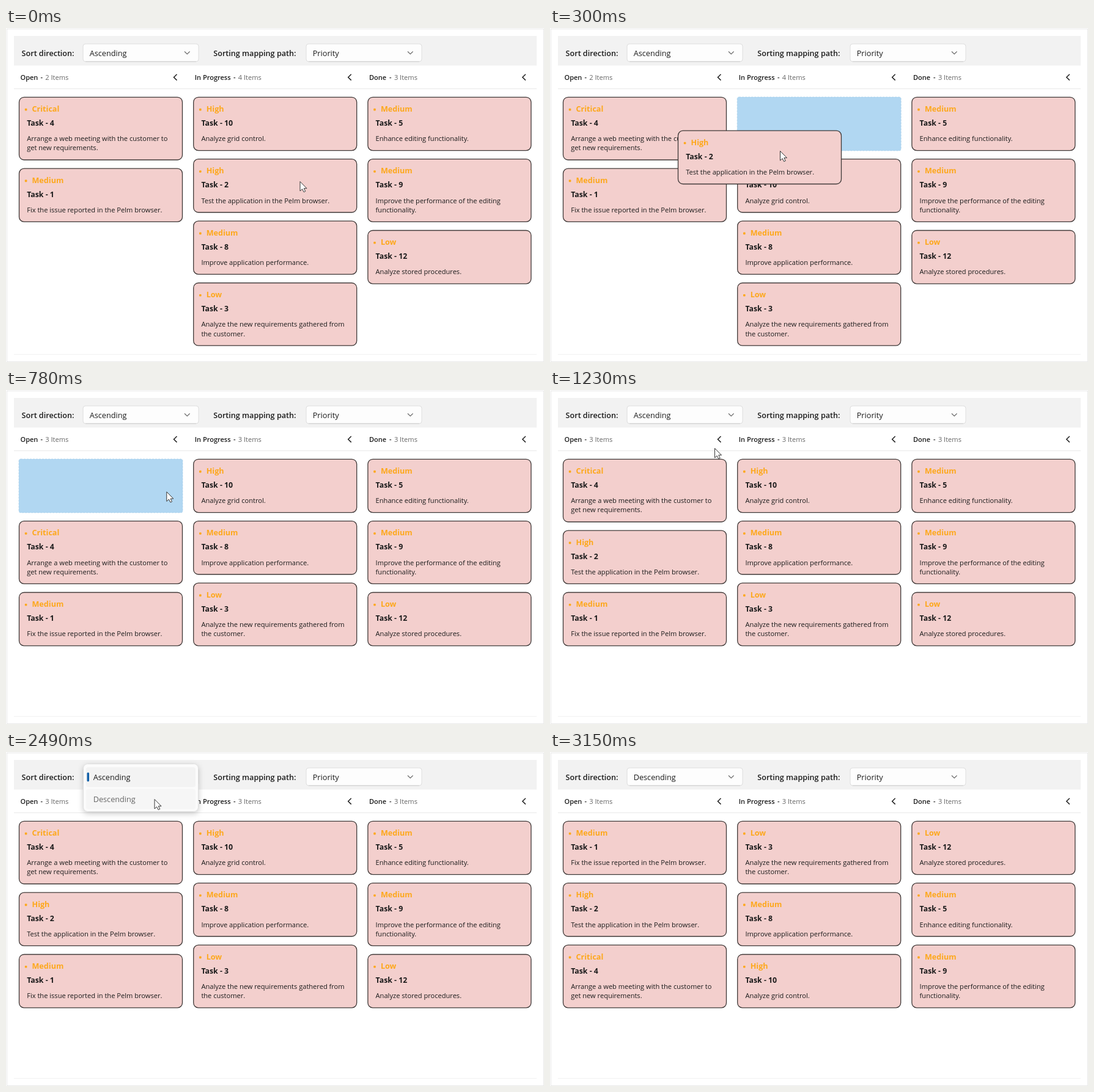
Write an HTML page that moves like this. It is 880 px wide and 547 px high and loops after 3.21 s.

```html
<!DOCTYPE html>
<html lang="en">
<head>
<meta charset="utf-8">
<title>Kanban sorting</title>
<style>
html, body { margin: 0; width: 100%; height: 100%; overflow: hidden; background: #fff; }
svg { display: block; font-family: "Open Sans", "Noto Sans", sans-serif; }
text { fill: #1b1b1b; font-size: 11.1px; white-space: pre; }
.label { font-size: 12.6px; font-weight: 600; }
.value { font-size: 12.7px; }
.head { font-size: 11px; font-weight: 600; }
.count { fill: #666; }
.prio { font-size: 12.6px; font-weight: 700; fill: #fda81c; }
.task { font-size: 12.3px; font-weight: 700; }
.card { fill: #f3cfcd; stroke: #403a39; stroke-width: 1.3; }
.slot { fill: #b1d7f2; stroke: #a3cbe6; stroke-width: .6; stroke-dasharray: 3 2; }
.line { fill: none; stroke: #e9e9e9; }
.chev { fill: none; stroke: #222; stroke-width: 1.5; }
.drop { fill: none; stroke: #666; stroke-width: 1.1; }
.popup { fill: #fbfbfb; stroke: #dedede; filter: drop-shadow(0 3px 5px #0003); }
</style>
</head>
<body>
<svg id="stage" width="880" height="547" viewBox="0 0 880 547"></svg>
<script>
const LOOP = 3210, STEP = 30;
const LIFT = 60, SWAP = 270, ENTER = 510, DROP = 720, SETTLE = 870;
const OPEN = 1650, PRESS = 2400, CLOSE = 2700, SORT = 2760, LEAVE = 3150;

const tasks = {
  1: ['Medium', 'Fix the issue reported in the Pelm browser.'],
  2: ['High', 'Test the application in the Pelm browser.'],
  3: ['Low', 'Analyze the new requirements gathered from', 'the customer.'],
  4: ['Critical', 'Arrange a web meeting with the customer to', 'get new requirements.'],
  5: ['Medium', 'Enhance editing functionality.'],
  8: ['Medium', 'Improve application performance.'],
  9: ['Medium', 'Improve the performance of the editing', 'functionality.'],
  10: ['High', 'Analyze grid control.'],
  12: ['Low', 'Analyze stored procedures.']
};

// Pointer stops: time, x, y
const path = [
  [0, 481, 251.5], [300, 376.5, 201.5], [630, 262.8, 166.8], [1080, 262.8, 166.8],
  [1230, 269.5, 95.5], [1410, 283, 42], [1740, 283, 42], [2010, 245.5, 72.3],
  [2220, 243, 77.5], [2730, 243, 77.5], [3120, 232, 14]
];

const text = (x, y, cls, s) => `<text x="${x}" y="${y}" class="${cls}">${s}</text>`;
const rect = (x, y, w, h, r, attrs) =>
  `<rect x="${x}" y="${y}" width="${w}" height="${h}" rx="${r}" ${attrs}/>`;
const height = id => id && tasks[id][2] ? 102.7 : 87.3;

function pointer(t) {
  const i = Math.max(1, path.findIndex(p => p[0] >= t));
  const [t0, x0, y0] = path[i - 1], [t1, x1, y1] = path[i];
  const k = (t - t0) / (t1 - t0);
  return [x0 + (x1 - x0) * k, y0 + (y1 - y0) * k];
}

function card(id, x, y) {
  if (!id) return rect(x - .5, y - .3, 268, 88, 3, 'class="slot"');
  const [prio, ...lines] = tasks[id];
  return rect(x, y, 267, height(id), 8, 'class="card"') +
    rect(x + 9.3, y + 18.5, 3.6, 3.6, 1, 'fill="#fda81c"') +
    text(x + 21, y + 23.6, 'prio', prio) +
    text(x + 12.7, y + 46.6, 'task', 'Task - ' + id) +
    lines.map((s, i) => text(x + 12.7, y + 71.8 + i * 15.3, '', s)).join('');
}

function column(i, name, dashX, count, ids) {
  const x = 21.5 + i * 285.2;
  let y = 113.3;
  const cards = ids.map(id => {
    const c = card(id, x, y);
    y += height(id) + 14.1;
    return c;
  });
  return text(x + 2, 84.7, 'head', name) +
    text(x + dashX, 84.7, 'head', '-') +
    text(x + dashX + 7.8, 84.7, 'count', count + ' Items') +
    `<path class="chev" d="M${x + 258} 75.8l-5 4.9 5 4.9"/>` + cards.join('');
}

function combo(x, value) {
  return rect(x, 26, 189, 29, 4, 'fill="#fdfdfd" stroke="#dedede"') +
    `<path d="M${x + 4} 55h181" stroke="#cfcfcf"/>` +
    text(x + 10.7, 45.6, 'value', value) +
    `<path class="drop" d="M${x + 166} 38.5l4.3 4.2 4.3-4.2"/>`;
}

function popup(t) {
  const k = 1 - (1 - Math.min(1, (t - OPEN + STEP) / 150)) ** 3;
  const pressed = t >= PRESS;
  const hover = t >= 1890;
  const list = rect(126.5, 19.5, 188, 78, 7, 'class="popup"') +
    rect(131, 25, 179, 32.5, 4, 'fill="#f3f3f3"') +
    rect(132.5, 33.5, 3.5, 15, 1.7, 'fill="#1260a8"') +
    text(142.7, 46.2, 'value', 'Ascending') +
    (hover ? rect(131, 60.5, 179, 33, 4, `fill="${pressed ? '#f6f6f6' : '#f3f3f3'}"`) : '') +
    `<g opacity="${pressed ? .65 : 1}">${text(142.7, 81.6, 'value', 'Descending')}</g>`;
  return `<clipPath id="reveal">${rect(112, 8, 218, 47 + 58 * k, 0, '')}</clipPath>
    <g clip-path="url(#reveal)">${list}</g>`;
}

function draw(t) {
  const sorted = t >= SORT, dropped = t >= DROP;
  const [x, y] = pointer(t);
  const open = sorted ? [1, 2, 4] : t >= SETTLE ? [4, 2, 1] : t >= ENTER ? [0, 4, 1] : [4, 1];
  const progress = sorted ? [3, 8, 10] : t >= ENTER ? [10, 8, 3] :
    t >= SWAP ? [0, 10, 8, 3] : t >= LIFT ? [10, 0, 8, 3] : [10, 2, 8, 3];
  const done = sorted ? [12, 5, 9] : [5, 9, 12];

  let s = rect(1.5, 1.5, 878, 545, 0, 'class="line"') +
    rect(13, 13, 855, 48.5, 0, 'fill="#f2f2f2"') +
    '<path class="line" d="M13 99.5h855"/><path class="line" d="M13 534.5h855" opacity=".6"/>' +
    text(25.6, 45.8, 'label', 'Sort direction:') +
    combo(126, t >= CLOSE ? 'Descending' : 'Ascending') +
    text(339.3, 45.8, 'label', 'Sorting mapping path:') +
    combo(491, 'Priority') +
    column(0, 'Open', 35, dropped ? 3 : 2, open) +
    column(1, 'In Progress', 65.3, dropped ? 3 : 4, progress) +
    column(2, 'Done', 35.2, 3, done);

  if (t >= OPEN && t < CLOSE) s += popup(t);
  if (t >= LIFT && !dropped) s += card(2, x - 167, y - 33.3);
  if (t < LEAVE) s += `<path transform="translate(${x} ${y})" fill="#fff" stroke="#333"
    d="M0 0V15.5L3.6 12.2L6.2 17.2L8.7 16L6.3 11.2H11Z"/>`;
  stage.innerHTML = s;
}

const stage = document.getElementById('stage');
const start = performance.now();
let last = -1;

function tick() {
  const now = (performance.now() - start) % LOOP;
  const t = Math.min(LEAVE, Math.floor(now / STEP) * STEP);
  if (t !== last) draw(last = t);
  requestAnimationFrame(tick);
}
tick();
</script>
</body>
</html>
```
